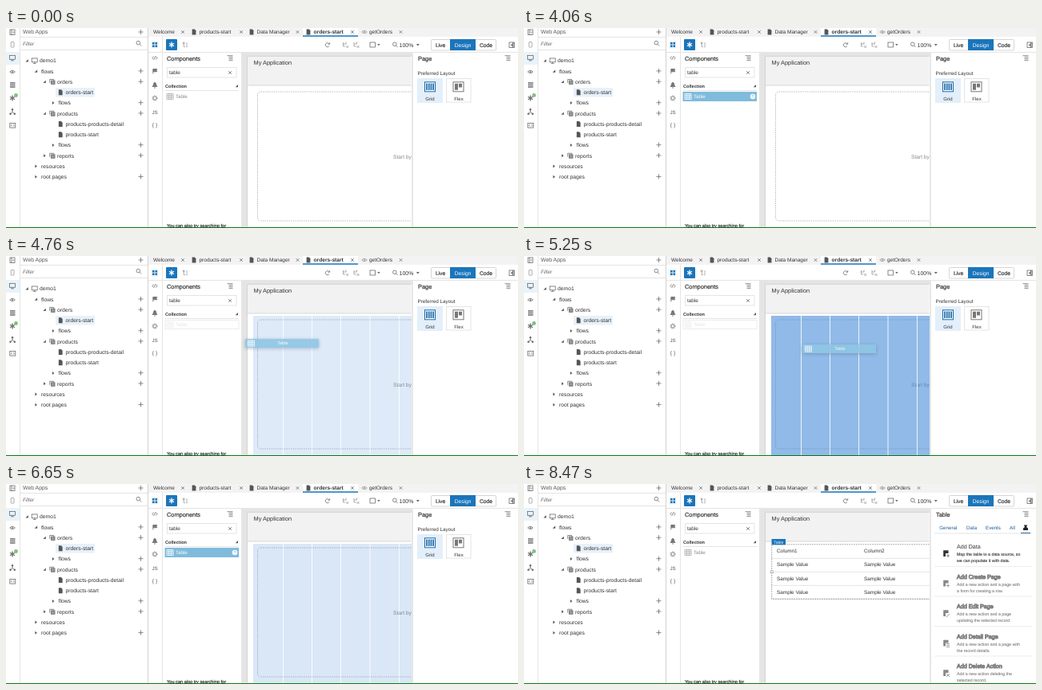
An HTML page that plays this animation: 640x251 px, repeating every 8.54 s.

```html
<!DOCTYPE html>
<html lang="en">
<head>
<meta charset="utf-8">
<title>Drag a table onto a page</title>
<style>
html, body { margin: 0; width: 100%; height: 100%; overflow: hidden; background: #fff; }
svg { display: block; width: 100%; height: 100%; }
text { font: 6.65px "Liberation Sans", Arial, sans-serif; fill: #333; text-rendering: geometricPrecision; }
.title { font-size: 7.4px; }
.title, .firm { stroke: #333; stroke-width: .2; }
.tab { font-size: 6.5px; }
.cell { font-size: 6.4px; }
.small { font-size: 5.25px; stroke: #333; stroke-width: .12; }
.white { fill: #fff; }
.mid { text-anchor: middle; }
.line { fill: none; stroke: #e4e4e4; }
.icon { fill: none; stroke: #6b6b6b; stroke-width: .8; }
.pale { stroke: #999; }
.off text { fill: #808080; stroke: #808080; }
.off .icon { stroke: #888; }
.off .solid { fill: #888; }
.links text { font-size: 6.2px; fill: #1d5c94; }

.anim { animation: 8540ms linear infinite; }
.step { animation-timing-function: step-end; }
#rowIdle { animation-name: rowIdle; }
#rowHot { animation-name: rowHot; }
#rowGhost { animation-name: rowGhost; }
#chip { animation-name: chipMove, chipShow; }
#overlay { animation-name: overlay; }
#empty, #pagePanel { animation-name: before; }
#table, #tablePanel { animation-name: after; }
#loading { animation-name: loading; }
#actions, #selection { animation-name: ready; }
@keyframes rowIdle { 0% { opacity: 1 } 53.2% { opacity: 0 } 88.4%, 100% { opacity: 1 } }
@keyframes rowHot {
  0%, 38.4% { opacity: 0 } 40.9%, 53.19% { opacity: 1 }
  53.2%, 77% { opacity: 0 } 77.01%, 88.39% { opacity: 1 } 88.4%, 100% { opacity: 0 }
}
@keyframes rowGhost { 0% { opacity: 0 } 53.2% { opacity: 1 } 77%, 100% { opacity: 0 } }
@keyframes chipMove {
  0%, 53.2% { transform: translate(199px, 80px) }
  54.9% { transform: translate(287px, 102px) }
  57.4% { transform: translate(322px, 108px) }
  61.45% { transform: translate(348px, 111px) }
  64.7%, 100% { transform: translate(346px, 111px) }
}
@keyframes chipShow {
  0%, 53.2% { opacity: 0 } 53.21%, 72.1% { opacity: .9 } 75.4%, 100% { opacity: 0 }
}
@keyframes overlay { 0%, 55.1% { opacity: 0 } 57.3%, 76.3% { opacity: 1 } 78.7%, 100% { opacity: 0 } }
@keyframes before { 0% { opacity: 1 } 82%, 100% { opacity: 0 } }
@keyframes after { 0% { opacity: 0 } 82%, 100% { opacity: 1 } }
@keyframes loading { 0% { opacity: 1 } 88.4%, 100% { opacity: 0 } }
@keyframes ready { 0% { opacity: 0 } 88.4%, 100% { opacity: 1 } }
</style>
</head>
<body>
<svg viewBox="0 0 640 251" preserveAspectRatio="none">
  <defs>
    <path id="plus" class="icon" d="M-3 0H3M0-3V3"/>
    <path id="cross" class="icon" d="M-1.8-1.8 1.8 1.8M-1.8 1.8 1.8-1.8"/>
    <path id="menu" class="icon" d="M-3.5-3H3.5M-1.5-1H3.5M-1.5 1H3.5M-1.5 3H3.5"/>
    <path id="file" fill="#555" d="M-2.4-3.5H.8L2.4-1.7V3.5H-2.4Z"/>
    <g id="pages" class="icon"><path d="M-3 1.5V-3H2V-1.5"/><rect x="-1.3" y="-1.4" width="4.6" height="4.4" fill="#999"/></g>
    <g id="grid" fill="none" stroke-width=".8"><path d="M-4-3.5H4V3.5H-4ZM-4-1.2H4M-4 1.1H4M-1.4-3.5V3.5M1.4-3.5V3.5"/></g>
    <g id="eye"><path d="M-3.3 0Q0-3.4 3.3 0Q0 3.4-3.3 0Z"/><circle r=".9"/></g>
    <g id="screen" class="icon"><rect x="-3.5" y="-3" width="7" height="4.8"/><path d="M0 2V3.4M-2 3.4H2"/></g>
    <g id="lens" class="icon"><circle r="2.3" cx="-.7" cy="-.7"/><path d="M1 1 3.2 3.2"/></g>
    <g id="star" stroke-width="1.3"><path d="M0-3.5V3.5M-3-1.8 3 1.8M-3 1.8 3-1.8"/></g>
    <pattern id="dots" width="2" height="2" patternUnits="userSpaceOnUse">
      <rect width="2" height="2" fill="#e8e8e8"/><rect width="1" height="1" fill="#d9d9d9"/>
    </pattern>
    <filter id="shadow" x="-20%" y="-80%" width="140%" height="260%">
      <feDropShadow dx="0" dy="1" stdDeviation="2" flood-color="#456" flood-opacity=".4"/>
    </filter>
    <clipPath id="pageClip"><path d="M301 30H506.5V250H301Z"/></clipPath>
  </defs>
  <rect width="640" height="251" fill="#fff"/>

  <!-- side strip -->
  <rect y="30" width="17" height="16" fill="#e9f3fb"/>
  <path class="line" d="M17.5 0V250"/>
  <g class="icon">
    <rect x="5" y="2" width="6" height="6.5"/><path d="M7 2V8.5M10.5 5.2H8.3"/>
    <rect x="6.2" y="17.5" width="3.8" height="6.6" rx=".6" class="pale"/>
    <use href="#screen" x="8" y="37.5" style="stroke:#1a73b5"/>
    <use href="#eye" x="8" y="55"/>
    <path d="M5 69H11.5M5 71.5H11.5M5 74H11.5" stroke-width="1.7"/>
    <use href="#star" x="8" y="88"/>
    <path d="M8 102V105L5.5 108M8 105 10.8 108"/>
    <rect x="4.8" y="119.5" width="7" height="5.6"/><path d="M7.3 121 6.2 122.3 7.3 123.6M9.3 121 10.4 122.3 9.3 123.6"/>
  </g>
  <g fill="#666"><circle cx="8" cy="102.3" r="1.2"/><circle cx="5.5" cy="107.8" r="1.2"/><circle cx="10.8" cy="107.8" r="1.2"/></g>
  <circle cx="12.5" cy="84.5" r="2.4" fill="#7fbf7e"/>

  <!-- app tree -->
  <text x="21" y="7.4" style="font-size:6.9px;fill:#555">Web Apps</text>
  <use href="#plus" x="168.5" y="5"/>
  <path class="line" d="M18 11.5H177M18 27.5H177"/>
  <text x="21" y="21.8" style="font-size:6.4px;font-style:italic;fill:#666">Filter</text>
  <use href="#lens" x="166" y="19.3"/>
  <rect x="62" y="75" width="49" height="11.5" fill="#e8f1fa"/>
  <g id="tree"></g>
  <path class="line" d="M177.5 0V250" style="stroke:#d2d2d2"/>

  <!-- tabs -->
  <rect x="178" width="462" height="11" fill="#f3f3f3"/>
  <rect x="371" width="69" height="11" fill="#fff"/>
  <rect x="371" y="9.3" width="69" height="1.5" fill="#1a75bb"/>
  <g id="tabs"></g>
  <use href="#eye" x="448" y="5" class="icon pale"/>

  <!-- toolbar -->
  <path class="line" d="M178 30.5H640M195.5 11V250M294.5 30V250"/>
  <rect x="181.5" y="16.5" width="9" height="9" fill="#e4f0fa"/>
  <path fill="#1a70b0" d="M183 18H185.5V20.5H183ZM186.5 18H189V20.5H186.5ZM183 21.5H185.5V24H183ZM186.5 21.5H189V24H186.5Z"/>
  <rect x="200" y="14" width="14" height="14" rx="1" fill="#1a75bb"/>
  <use href="#star" x="207" y="21" stroke="#fff"/>
  <g class="icon">
    <path class="pale" d="M221.3 18H223V19.7H221.3ZM225 19.2H227M225 21.4H227M225 23.6H227M222.2 19.7V23.6H224"/>
    <path d="M404 20A2.5 2.5 0 1 0 404 22.5M404.7 18.2V20.3H402.6"/>
    <path class="pale" d="M421.5 18V23H424M421.5 20H425V17.5M425 22 428 25M428 22 425 25M435 18V23H437.5M435 20H438.5V17.5M438.5 22 441.5 25M441.5 22 438.5 25"/>
    <rect x="455" y="18" width="6.5" height="6"/>
    <use href="#lens" x="486.5" y="21"/>
    <rect x="629" y="18" width="6.5" height="6.5"/><path d="M631 21.2H633M633.7 18V24.5" stroke-width="1.4"/>
  </g>
  <text x="491.5" y="23.5" style="font-size:7px">100%</text>
  <path d="M512.8 20H516.8L514.8 22.4ZM464.2 20H467.6L465.9 22.2Z" fill="#666"/>
  <rect x="531.5" y="14.5" width="81" height="13.5" rx="1" class="line" style="stroke:#d6d6d6"/>
  <rect x="555" y="14" width="32" height="14" fill="#1a75bb"/>
  <text x="543" y="23.5" class="mid firm">Live</text>
  <text x="571" y="23.5" class="mid white">Design</text>
  <text x="600" y="23.5" class="mid firm">Code</text>

  <!-- icon column -->
  <g class="icon">
    <path d="M184.5 35.5 183 37.5 184.5 39.5M187.5 35.5 189 37.5 187.5 39.5M186.6 35.5 185.4 39.5"/>
    <path d="M183.8 57.5V51.5H188.8L187.8 53 188.8 54.8H183.8" fill="#777"/>
    <path d="M183 73.5Q184.5 72 184.5 70Q186 66.5 187.5 70Q187.5 72 189 73.5ZM185 75H187" fill="#777"/>
    <circle cx="186" cy="88" r="2.1"/><circle cx="186" cy="88" r="3.1" stroke-dasharray="1.3 1.3"/>
  </g>
  <text x="186" y="107.5" class="mid" style="font-size:6.2px;fill:#555">JS</text>
  <text x="186" y="124" class="mid" style="fill:#555">{ }</text>

  <!-- components -->
  <text x="201" y="40.5" class="title">Components</text>
  <use href="#menu" x="280" y="37.7"/>
  <rect x="201.5" y="49.5" width="86.5" height="12.5" class="line"/>
  <text x="204" y="58" class="cell">table</text>
  <use href="#cross" x="280" y="56"/>
  <text x="199" y="75" style="font-size:5.6px;font-weight:bold">Collection</text>
  <path d="M290 71V74.3H286.8Z" fill="#555"/>
  <path class="line" d="M199 78.5H291"/>
  <g id="rowIdle" class="anim step">
    <use href="#grid" x="205" y="86" stroke="#aaa"/>
    <text x="212" y="88" style="font-size:6.2px;fill:#888">Table</text>
  </g>
  <g id="rowGhost" class="anim step">
    <rect x="199" y="80.5" width="92" height="11" class="line" style="stroke:#d9d9d9" stroke-dasharray="1 1"/>
    <use href="#grid" x="205" y="86" stroke="#eee"/>
    <text x="212" y="88" style="font-size:6.2px;fill:#e3e3e3">Table</text>
  </g>
  <g id="rowHot" class="anim">
    <rect x="198.5" y="80" width="92.5" height="12" fill="#7fbbdc"/>
    <use href="#grid" x="205" y="86" stroke="#fff"/>
    <text x="212" y="88" class="white" style="font-size:6.2px">Table</text>
    <circle cx="286" cy="86" r="3.2" fill="#fff"/>
    <text x="286" y="88" class="mid" style="font-size:5.5px;fill:#579fc8">?</text>
  </g>
  <text x="201" y="250.4" class="firm" style="font-size:5.65px">You can also try searching for</text>

  <!-- page canvas -->
  <path d="M295 31H507V35H301V250H295Z" fill="url(#dots)"/>
  <g clip-path="url(#pageClip)">
    <rect x="301" y="35" width="210" height="37" fill="#f2f2f2"/>
    <path class="line" d="M301.5 250V35.5H510M301 72H510" style="stroke:#d6d6d6"/>
    <text x="309.5" y="46" style="font-size:7.4px">My Application</text>
    <g id="empty" class="anim step">
      <rect x="314.5" y="80" width="240" height="162" rx="4" class="line" style="stroke:#b5b5b5" stroke-width=".9" stroke-dasharray="1.5 1.2"/>
      <text x="484" y="164" style="fill:#888">Start by dragging</text>
    </g>
    <g id="overlay" class="anim">
      <rect x="309" y="75" width="200" height="175" fill="#3f86d6" fill-opacity=".57"/>
      <path d="M346.5 75V250M382.5 75V250M418.5 75V250M455 75V250M491.5 75V250" stroke="#fff" stroke-opacity=".85"/>
    </g>
    <g id="table" class="anim step"></g>
  </g>
  <g id="selection" class="anim step">
    <path d="M506.5 75.8H309.7V144.3H506.5" fill="none" stroke="#777" stroke-width=".7" stroke-dasharray="1.7 1.2"/>
    <rect x="309.5" y="69" width="17.5" height="7.3" fill="#1a75bb"/>
    <text x="318.2" y="74.5" class="mid white" style="font-size:5px">Table</text>
    <rect x="308.2" y="108.8" width="3" height="3" fill="#fff" stroke="#888" stroke-width=".6"/>
  </g>

  <!-- property panel -->
  <path class="line" d="M508 31V250" style="stroke:#d0d0d0"/>
  <use href="#menu" x="627" y="37.7"/>
  <g id="pagePanel" class="anim step">
    <text x="515" y="40.5" class="title">Page</text>
    <text x="514.5" y="59" style="font-size:6.3px">Preferred Layout</text>
    <rect x="514" y="63" width="32" height="31" fill="#e3effa"/>
    <rect x="550.5" y="63.5" width="30.5" height="29.5" class="line"/>
    <rect x="523.5" y="67.8" width="13" height="12" fill="#fff" stroke="#1a6aa8"/>
    <path d="M526 69.5V78M528.7 69.5V78M531.4 69.5V78M534.1 69.5V78" stroke="#1a6aa8" stroke-width="1.7"/>
    <rect x="559" y="67.8" width="13" height="12" fill="#fff" stroke="#777"/>
    <path d="M561 69.8H565V77.8H561ZM566 69.8H570V74.5H566Z" fill="#777"/>
    <text x="530" y="91.2" class="mid" style="font-size:6px">Grid</text>
    <text x="566" y="91.2" class="mid" style="font-size:6px">Flex</text>
  </g>
  <g id="tablePanel" class="anim step">
    <text x="515" y="40.5" class="title">Table</text>
    <g class="links">
      <text x="519.3" y="57.3">General</text><text x="553" y="57.3">Data</text>
      <text x="577" y="57.3">Events</text><text x="607" y="57.3">All</text>
    </g>
    <path d="M624 58V55.5L626 54 624.8 51.5H629.2L628 54 630 55.5V58Z" fill="#222"/>
    <path class="line" d="M513 62H635"/>
    <path d="M621 61.5H633" stroke="#3a6f9c" stroke-width="1.1"/>
    <path id="loading" class="line anim step" d="M515 75.5H634M515 82.5H634M515 89.5H634M515 97.5H634" stroke-dasharray="2 1"/>
  </g>
  <g id="actions" class="anim step"></g>

  <g id="chip" class="anim">
    <rect width="92" height="11" fill="#8ec6e4" filter="url(#shadow)"/>
    <use href="#grid" x="7.5" y="5.6" stroke="#fff"/>
    <text x="47" y="7.4" class="mid white" style="font-size:5.6px">Table</text>
  </g>
  <rect y="250" width="640" height="1" fill="#0a7a12"/>
</svg>
<script>
const fill = (id, items, draw) => { document.getElementById(id).innerHTML = items.map(draw).join(""); };
const use = (name, x, y) => `<use href="#${name}" x="${x}" y="${y}"/>`;
const text = (x, y, label, attrs = "") => `<text x="${x}" y="${y}" ${attrs}>${label}</text>`;

// label, text x, icon, arrow (v = open, > = closed), has plus
const tree = [
  ["demo1", 42, "screen", "v"],
  ["flows", 44, "", "v", true],
  ["orders", 64, "pages", "v", true],
  ["orders-start", 74.5, "file"],
  ["flows", 65.5, "", ">", true],
  ["products", 64, "pages", "v", true],
  ["products-products-detail", 74.5, "file"],
  ["products-start", 74.5, "file"],
  ["flows", 65.5, "", ">", true],
  ["reports", 64, "pages", ">", true],
  ["resources", 44, "", ">"],
  ["root pages", 44, "", ">", true],
];
const arrows = { "v": "M1.6-1.8V1.6H-1.8Z", ">": "M-1.1-2 1.4 0-1.1 2Z" };
fill("tree", tree, ([label, x, icon, arrow, plus], i) => {
  const y = 41 + i * 13.25;
  const arrowX = x - (icon ? 15.8 : 6.5);
  return text(x, y + 2.4, label, 'style="font-size:6.75px"')
    + (icon ? use(icon, x - 6.3, y) : "")
    + (arrow ? `<path fill="#555" transform="translate(${arrowX} ${y})" d="${arrows[arrow]}"/>` : "")
    + (plus ? use("plus", 168.5, y - .3) : "");
});

const tabs = [
  ["Welcome", 184, 221], ["products-start", 241.5, 294, "file"], ["Data Manager", 313.5, 364.5, "file"],
  ["orders-start", 384.5, 433, "file"], ["getOrders", 454, 493.5],
];
fill("tabs", tabs, ([label, x, closeX, icon], i) =>
  text(x, 7.3, label, i === 3 ? 'style="font-weight:bold"' : 'class="tab"')
  + use("cross", closeX, 5) + (icon ? use(icon, x - 6.5, 5) : ""));

fill("table", [0, 1, 2, 3], i => {
  const y = 86.2 + i * 17.15;
  const cell = (x, n) => text(x, y, i ? "Sample Value" : "Column" + n, 'class="cell"');
  return cell(316, 1) + cell(425, 2) + `<path class="line" d="M309 ${93.3 + i * 17}H507"/>`;
});

const actions = [
  ["Add Data", "Map the table to a data source, so", "we can populate it with data.", "M2 1V5M0 3H4"],
  ["Add Create Page", "Add a new action and a page with", "a form for creating a row.", "M2 1V5M0 3H4"],
  ["Add Edit Page", "Add a new action and a page", "updating the selected record.", "M0 5 4 1"],
  ["Add Detail Page", "Add a new action and a page with", "the record details.", "M0 1H4M0 3H4M0 5H4"],
  ["Add Delete Action", "Add a new action deleting the", "selected record.", "M0 1 4 5M4 1 0 5"],
];
fill("actions", actions, ([title, first, second, mark], i) => {
  const y = 79 + i * 37.5;
  return `<g class="${i ? "off" : ""}">`
    + text(541, y + 2.4, title, 'style="font-size:7.15px"')
    + text(541, y + 11.2, first, 'class="small"') + text(541, y + 19.2, second, 'class="small"')
    + `<g transform="translate(528 ${y + 8})"><path class="solid" fill="#333" d="M-3.8-3.8H2.5V0H-1V4H-3.8Z"/>`
    + `<path class="icon" d="${mark}"/></g>`
    + `<path class="line" style="stroke:#ededed" d="M513 ${y + 24.5}H635"/></g>`;
});
</script>
</body>
</html>
```
